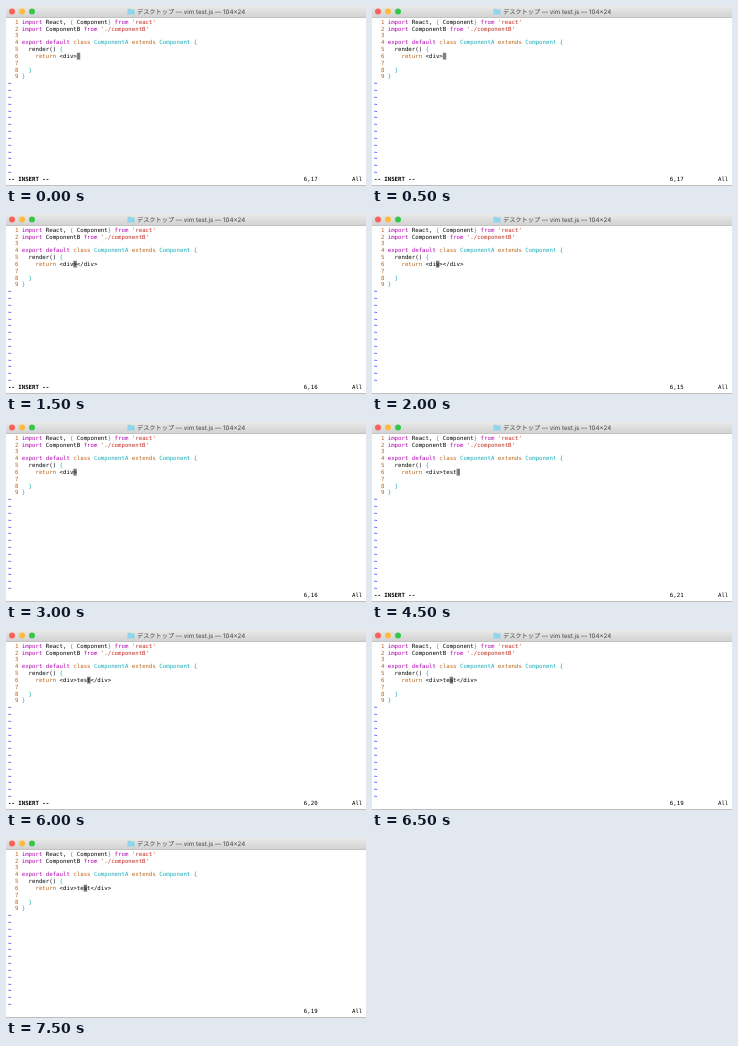
These frames come from a looping animation (360 by 180 pixels, 8000 ms). An HTML page:

```html
<!DOCTYPE html>
<html lang="ja">
<head>
<meta charset="utf-8">
<title>vim test.js</title>
<style>
html, body { margin: 0; width: 100%; height: 100%; overflow: hidden; background: #fff; }
svg { display: block; width: 360px; height: 180px; }
text { white-space: pre; text-rendering: geometricPrecision; }
#screen text { font: 5.714px "DejaVu Sans Mono", monospace; }
#title { font: 6.2px Inter, "Noto Sans CJK JP", "Noto Sans CJK", sans-serif; fill: #444; }
</style>
</head>
<body>
<svg viewBox="0 0 360 180">
  <defs>
    <linearGradient id="bar" x2="0" y2="1">
      <stop stop-color="#e9e9e9"/>
      <stop offset="1" stop-color="#d3d3d3"/>
    </linearGradient>
  </defs>
  <rect width="360" height="180" fill="#fff"/>
  <rect width="360" height="11" fill="url(#bar)"/>
  <rect y="11" width="360" height="1" fill="#c4c4c4"/>
  <rect y="179" width="360" height="1" fill="#bdbdbd"/>
  <circle cx="6" cy="5.5" r="3" fill="#fc605b"/>
  <circle cx="16" cy="5.5" r="3" fill="#fdbc40"/>
  <circle cx="26" cy="5.5" r="3" fill="#34c84a"/>
  <path d="M121.5 2.8h2.6l.7.7h3.8v4.9h-7.1z" fill="#8fd3ec"/>
  <text id="title" x="131" y="7.8">デスクトップ — vim test.js — 104×24</text>
  <g id="screen"></g>
</svg>
<script>
const CELL = 3.44, ROW = 6.83, LEFT = 2, TOP = 12.6, GUTTER = 4;
const INK = '#000', BROWN = '#b8651b', PURPLE = '#b200b2', TEAL = '#12adb8', RED = '#c02a1d', BLUE = '#1a1aff';
const LOOP = 8000, EDIT_ROW = 5;

const screen = document.getElementById('screen');

function add(name, attrs) {
  const el = document.createElementNS('http://www.w3.org/2000/svg', name);
  for (const key in attrs) el.setAttribute(key, attrs[key]);
  return screen.appendChild(el);
}

function put(col, row, str, fill = INK) {
  const el = add('text', { x: LEFT + col * CELL, y: TOP + row * ROW + 5.2, fill });
  el.textContent = str;
  return el;
}

const cursor = add('rect', { y: TOP + EDIT_ROW * ROW, width: CELL, height: ROW, fill: '#7f7f7f' });

const code = [
  [['import', PURPLE], [' React, '], ['{', TEAL], [' Component'], ['}', TEAL], [' from ', PURPLE], ["'react'", RED]],
  [['import', PURPLE], [' ComponentB '], ['from ', PURPLE], ["'./componentB'", RED]],
  [],
  [['export default ', PURPLE], ['class ', BROWN], ['ComponentA ', TEAL], ['extends ', BROWN], ['Component {', TEAL]],
  [['  render() '], ['{', TEAL]],
  [['    return', BROWN]],
  [],
  [['  }', TEAL]],
  [['}', TEAL]]
];

code.forEach((line, row) => {
  put(2, row, row + 1, BROWN);
  let col = GUTTER;
  for (const [str, fill] of line) {
    put(col, row, str, fill);
    col += str.length;
  }
});
for (let row = code.length; row < 23; row++) put(0, row, '~', BLUE).style.fontWeight = 'bold';

const markup = put(GUTTER + 11, EDIT_ROW, '');
const mode = put(0, 23, '-- INSERT --');
mode.style.fontWeight = 'bold';
const ruler = put(86, 23, '');
put(100, 23, 'All');

// start time, markup, cursor column, insert mode
const steps = [
  [0, '<div>', 17, true],
  [1000, '<div></div>', 16, true],
  [2000, '<div></div>', 15, false],
  [2500, '<div></div>', 17, false],
  [3000, '<div>', 16, false],
  [3500, '<div>', 17, true],
  [4000, '<div>te', 19, true],
  [4500, '<div>test', 21, true],
  [6000, '<div>test</div>', 20, true],
  [6500, '<div>test</div>', 19, false]
];

let shown;
function draw() {
  const t = performance.now() % LOOP;
  const step = steps.findLast(s => s[0] <= t);
  if (step !== shown) {
    const [, str, col, insert] = shown = step;
    markup.textContent = str;
    cursor.setAttribute('x', LEFT + (GUTTER + col - 1) * CELL);
    mode.style.visibility = insert ? 'visible' : 'hidden';
    ruler.textContent = '6,' + col;
  }
  requestAnimationFrame(draw);
}
draw();
</script>
</body>
</html>
```
